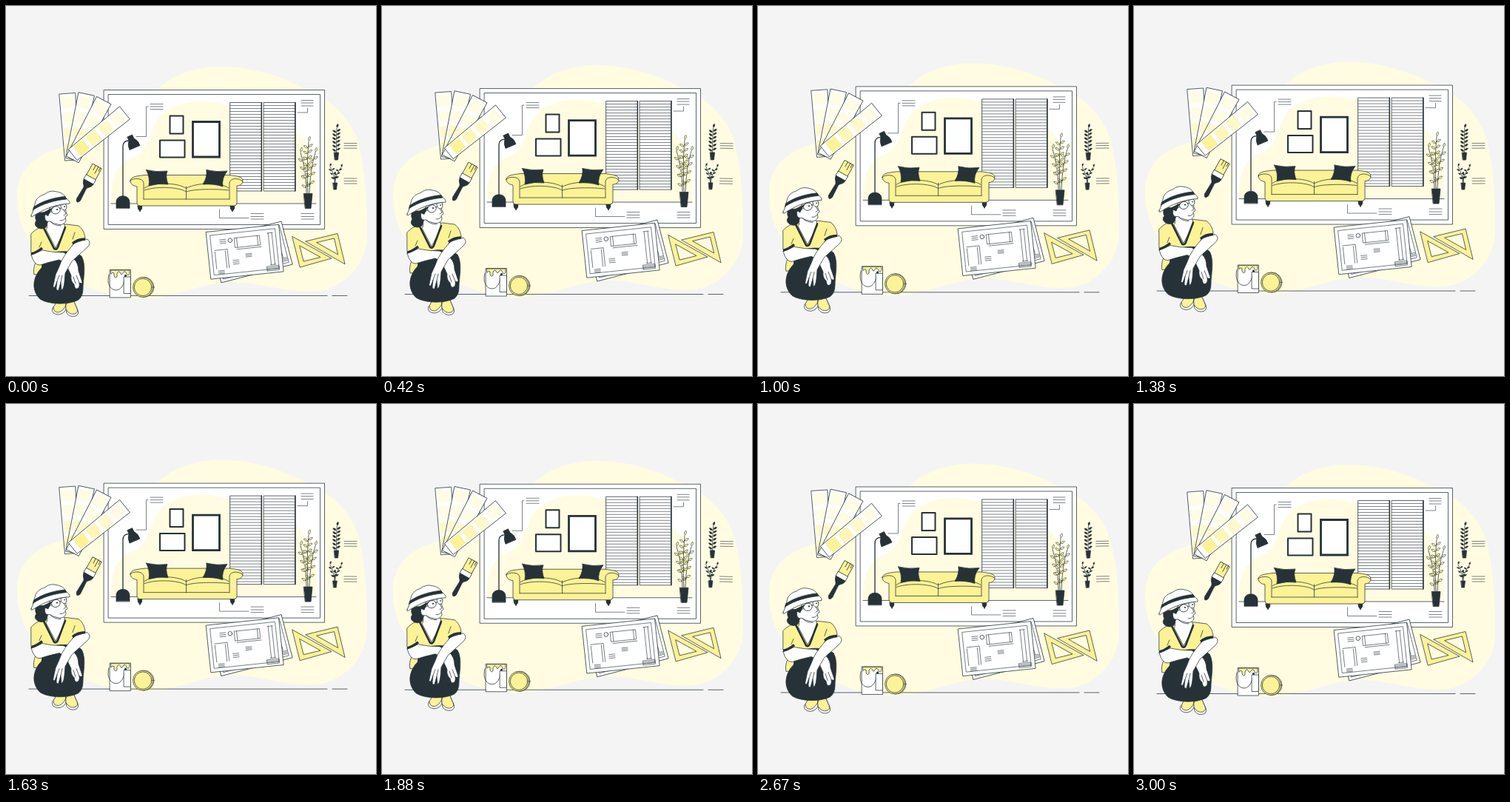
Animation of 500x500 px, one loop 3040 ms. Source, as an HTML page:

```html
<!DOCTYPE html>
<html lang="en">
<head>
<meta charset="utf-8">
<style>
html, body { margin: 0; height: 100%; overflow: hidden; background: #f4f4f4; }
svg { display: block; width: 100%; height: 100%; }
.ink { fill: none; stroke: #263238; stroke-width: .75; stroke-linejoin: round; stroke-linecap: round; }
.thin { stroke-width: .6; }
.w { fill: #fff; }
.y { fill: #fcf296; }
.p { fill: #fffce1; }
.d { fill: #263238; }
.none { stroke: none; }
</style>
</head>
<body>
<svg viewBox="0 0 500 500">
<g id="scene" class="ink">
  <path class="p none" d="M203 114C225 92 258 82 290 82C337 82 380 98 412 116C444 130 468 155 477 188C485 218 489 270 488 312C487 350 455 386 411 386C373 386 338 372 303 373C263 374 225 396 181 396C133 395 82 372 48 337C25 315 15 288 15 258C15 230 28 208 63 195C118 176 166 157 203 114Z"/>
  <path d="M31 391.5H434M441 391.5H461"/>

  <g id="board">
    <path class="w" d="M132.5 113.5H430.5V301.5H132.5Z"/>
    <path class="w" d="M138.5 119.5H424.5V295.5H138.5Z"/>
    <path class="p none" d="M142 267C141 232 150 213 172 205C198 195 191 159 216 142C241 125 276 126 304 136C340 149 385 157 402 181C417 205 422 238 419 267Z"/>
    <path d="M142 267H419"/>
    <g id="blinds"></g>
    <path class="w" stroke-width="2" d="M221.5 148.5H239.5V172.5H221.5ZM208 181.5H241.5V204.5H208Z"/>
    <path class="w" stroke-width="2.8" stroke-linejoin="miter" d="M252.5 156.5H288.5V204H252.5Z"/>

    <path class="d" d="M178 270H184L183 274L181 278L179 274ZM303 270H309L308 274L306 278L304 274Z"/>
    <circle class="d" cx="181" cy="273" r="2.6"/><circle class="d" cx="306" cy="273" r="2.6"/>
    <path class="y" d="M168 236C169 230 177 230 187 228.5H302C312 230 320 230 320 237C319 242 315 243 312 243V266Q312 270 308 270H181Q177 270 177 266V244C172 243 168 241 168 236Z"/>
    <path d="M168 236C172 232 185 232 186 239V261M320 237C315 232 303 232 302 239V261M186 261H302M243.5 244V261M187 246C197 238 231 238 243 246M187 249C207 242 238 246 243 251M244 246C260 238 290 238 301 246M244 251C253 247 286 247 301 249"/>
    <path class="d" d="M189.5 221.5Q204 225 218 223Q215 230 219 241Q206 239 193 243Q195 232 189.5 221.5ZM271 221.5Q285 225 299 223Q291 233 293 244Q281 240 266 241Q272 232 271 221.5Z"/>

    <path stroke-width="1.3" d="M158 258V190Q158 182 166 182"/>
    <path class="d" d="M149 273V265C149 254 167 254 167 265V273ZM164 177L170.5 174L173 179Q179 182 181 188.5L167 194.5Q164 188 166 182Z"/>

    <g class="thin">
      <path d="M176 176.5H189.5V136H192M407.5 138V144H394M288.5 275V286.5H328"/>
      <path d="M195 132.5h17m-17 3.5h17m-17 3.5h17M399 127.5h16m-16 3.5h16m-16 4h16M331 280.5h17m-17 4h17m-17 3.5h17M399 280.5h17m-17 4h17m-17 3.5h17"/>
    </g>
    <g id="bigPlant"></g>
    <path class="d" d="M402.5 253.5H414L412 273.5H404.5Z"/>
  </g>

  <g id="swatches"></g>

  <g transform="rotate(29 110 240) translate(110 240)">
    <path class="y" d="M-6.5 -27H7V-9H-6.5Z"/>
    <path d="M-2 -27V-20M2 -27V-17M5 -27V-22"/>
    <path class="w" d="M-7 -10H7.5V-3H-7Z"/>
    <path class="d" d="M-7 -3H7.5C7 3 3 3 2 7L2.8 25Q0 32 -2.8 25L-2 7C-3 3 -6.5 3 -7 -3Z"/>
  </g>

  <g id="plans">
    <g transform="translate(276.2 315.8) rotate(-14.5)">
      <path class="w" d="M0 0H99V60H0Z"/><path class="thin" d="M4 4H95V56H4ZM84 51h10m-10 2h10m-10 -4h10M89 8V48"/>
    </g>
    <g transform="translate(270.5 305.5) rotate(-6)">
      <path class="w" d="M0 0H98.5V64H0Z"/>
      <path class="thin" d="M5 5H93V59H5ZM17 12.5h8m-8 2.500h8m-8 2.500h8M37 12H71V25H37ZM40 12V25M68 12V25M39 27.500H72M9 26H26V51M9 28V51M23 28V51M83 10V53M88 10V53M82 10h7M82 53h7M32 42h8m-8 2.500h8m-8 2.500h8M50 35h8m-8 2h8m-8 2h8M11 54h8m-8 2h8m-8 2h8M77 57H93M77 59H93M77 55H93V61H77Z"/>
      <circle cx="31" cy="14.500" r="2.800"/>
    </g>
  </g>

  <path class="y" fill-rule="evenodd" d="M387 311.5L440 341L397.5 353ZM397 324L425 339.500L402.500 345ZM405 318L448 307.500L458 348.500ZM420 319.500L443.500 314L448.500 335.500Z"/>

  <g id="can">
    <path class="w" d="M140.5 356.5H168.5V394H140.5Z"/>
    <path class="y" d="M142 357H167V362Q164 366 162 360Q160 357 158 361Q156 365 154 360Q152 357 150 362V366Q147 369 146 364V361Q144 359 142 362Z"/>
    <path d="M139 363C136 374 140 384 149 384C155 384 160 377 161 365"/>
    <path class="w" d="M159.5 366H168.5V388.5H159.5Z"/>
    <circle class="d" cx="161.5" cy="364.5" r="1.2"/>
    <circle class="y" cx="186.5" cy="380" r="13.5"/>
    <circle class="y" cx="185" cy="380" r="13.5"/>
    <circle class="y" cx="185" cy="380" r="11.7"/>
  </g>

  <g id="woman">
    <path class="w" d="M75 397L63 408Q60 416 71 417Q80 416 82 407ZM80 400L82 415Q86 421 94 419Q99 417 97 411L92 400Z"/>
    <path class="y" d="M75 389L64 407Q64 414 71 414Q78 412 82 402V392ZM80 394L81 410Q86 418 93 416Q98 414 96 409L89 393Z"/>
    <path class="y" d="M34 308C39 302 46 299 54 296L82 295L98 297C104 301 107 309 107 315L91 320L86 337L48 362L38 363Q36 357 40 346L34 333Z"/>
    <path class="d" d="M50 339C66 329 91 330 102 338C109 350 104 370 104 382Q104 392 98 397C86 404 58 404 46 396C33 383 37 365 48 354Z"/>
    <path class="w" d="M55 291Q57 300 54 302L67 327L80 302L79 295L70 289Z"/>
    <path stroke-width="2.6" d="M51 300L65 328Q68 330 70 326L80 299"/>
    <path class="w" d="M34 336L49 330Q62 333 78 333L92 342Q98 348 98 358L103 373Q103 376 99 374Q100 381 96 382Q93 383 92 376Q87 372 88 364L80 347L72 343Q58 346 46 350Q38 351 34 336Z"/>
    <path class="w" d="M93 320L110 315Q116 320 110 326L89 345L80 361L79 373Q78 383 75 384L74 373L71 384Q68 385 68 381L69 372L66 380Q63 381 64 377L67 363L72 352Q76 338 93 320Z"/>
    <path d="M74 373L76 364M69 372L72 364M94 375L91 366M99 374L95 364"/>
    <path stroke-width="3.4" stroke-linecap="butt" d="M34 335Q42 333 49 327M90 321Q97 315 107 315"/>
    <path d="M45 326L48 319M90 315L93 306"/>

    <path class="d" d="M40 282Q39 287 41 290Q37 295 42 299Q48 303 54 299L57 290L56 279L46 279Z"/>
    <path class="w" d="M53 289Q51 281 56 279L60 272L79 265L81 278L83 283L80 285L81 290Q79 296 72 295.500Q63 294 59 291Q55 292 53 289Z"/>
    <path class="d none" d="M50 279L66 271L61 276L57 284L53 282Z"/>
    <path d="M60 291Q64 297 74 297M73 290Q77 291 80 287M77 273L81 281L78 283"/>
    <ellipse class="w" cx="67.500" cy="276" rx="6" ry="5" transform="rotate(-20 67 276)"/>
    <ellipse class="w" cx="78" cy="271" rx="3.800" ry="5" transform="rotate(-18 78 271)"/>
    <path d="M62 278L55 281M73 274L74.500 272.500"/>
    <circle class="d none" cx="69" cy="275" r="1.100"/><circle class="d none" cx="79" cy="271" r=".9"/>
    <path class="w" d="M36.500 277L40 264Q43 257 52 254.500Q59 249 66 250.500Q76 252 78.500 256L84 266Z"/>
    <path class="w" d="M34 283C36 279 37 276 37 275C50 266 66 261 81.500 260Q87 264 86 267C68 268 51 274 35 285Q33 285 34 283Z"/>
    <path class="d" d="M36.500 275.500L37.500 271.500C50 263 66 258.500 80 257.500L82 261C66 262.500 50 267 36.500 275.500Z"/>
  </g>
</g>

<g id="sway" class="ink">
  <g id="smallPlants"></g>
  <path class="d" d="M443.5 198H449.5L448.5 208H444.5ZM442 239H447.5L446.5 248H443Z"/>
  <path class="thin" d="M457 185.500h17m-17 3.200h17m-17 3.500h17M457 233h17m-17 3.500h17m-17 3.500h17"/>
</g>
</svg>
<script>
const $ = id => document.getElementById(id);
const range = n => [...Array(n).keys()];

// Quadratic stem with paired leaves and one leaf at the tip
function stem([x0, y0], [cx, cy], [x1, y1], pairs, size, fill, start = .25) {
  const leaf = (x, y, a) => `<path class="${fill}" stroke-width=".5" transform="translate(${x} ${y}) rotate(${a})" d="M1 0Q${size * .5} ${-size * .42} ${size} 0Q${size * .5} ${size * .42} 1 0"/>`;
  let out = `<path d="M${x0} ${y0}Q${cx} ${cy} ${x1} ${y1}"/>`;
  for (const i of range(pairs)) {
    const k = start + (1 - start) * i / pairs, m = 1 - k;
    const x = m * m * x0 + 2 * m * k * cx + k * k * x1;
    const y = m * m * y0 + 2 * m * k * cy + k * k * y1;
    out += leaf(x, y, -32) + leaf(x, y + size * .25, -148);
  }
  return out + leaf(x1, y1, -75);
}

const shades = ['#fcf296', '#fdf6b6', '#fef9cc', '#fffce6'];
$('swatches').innerHTML = [[89, 208, -4], [90, 207, 12], [90, 207, 28], [90.5, 201, 51]].map(([x, y, a], n) =>
  `<g transform="translate(${x} ${y}) rotate(${a})"><path class="w" d="M-9.5 0L-11 -90H11L9.5 0Z"/>` +
  range(4).map(i => `<rect class="none" x="-8" y="${-23 - i * 21}" width="16" height="16" fill="${shades[Math.min(3, n < 3 ? i + 1 : i)]}"/>`).join('') +
  '</g>').join('');

$('blinds').innerHTML = [303, 348.5].map(x =>
  `<path class="w" d="M${x} 130.500h42.500v119.500h-42.500Z"/><path class="thin" d="${range(29).map(i => `M${x} ${134.5 + i * 4}h42`).join('')}"/>` +
  `<path stroke-width="1.500" d="M${x + 42.3} 130.500v119.500"/>`).join('');

$('bigPlant').innerHTML =
  stem([406, 253], [406, 222], [398, 198], 4, 7, 'y', .15) +
  stem([410, 253], [411, 220], [418, 198], 4, 7, 'y', .2) +
  stem([408, 253], [406, 215], [409, 183], 6, 7, 'y', .3);

$('smallPlants').innerHTML =
  stem([446.5, 198], [446, 180], [447, 165], 6, 6, 'd', .08) +
  stem([444.5, 239], [443, 226], [438, 217], 3, 4.5, 'd') +
  stem([444.5, 239], [446, 226], [453, 218], 3, 4.5, 'd') +
  '<path d="M444.500 239V225"/>';

const LOOP = 3040, FLOAT = 3000, WIND = 1500;

function draw() {
  const t = Math.min(performance.now() % LOOP, FLOAT);
  const lift = 7 * (1 - Math.abs(1 - 2 * t / FLOAT));
  const w = t % WIND / WIND;
  const tilt = w < .25 ? w * 4 : w < .75 ? 2 - w * 4 : w * 4 - 4;
  $('scene').setAttribute('transform', `translate(0 ${-lift})`);
  $('sway').setAttribute('transform', `rotate(${tilt} 455 204)`);
  requestAnimationFrame(draw);
}
draw();
</script>
</body>
</html>
```
